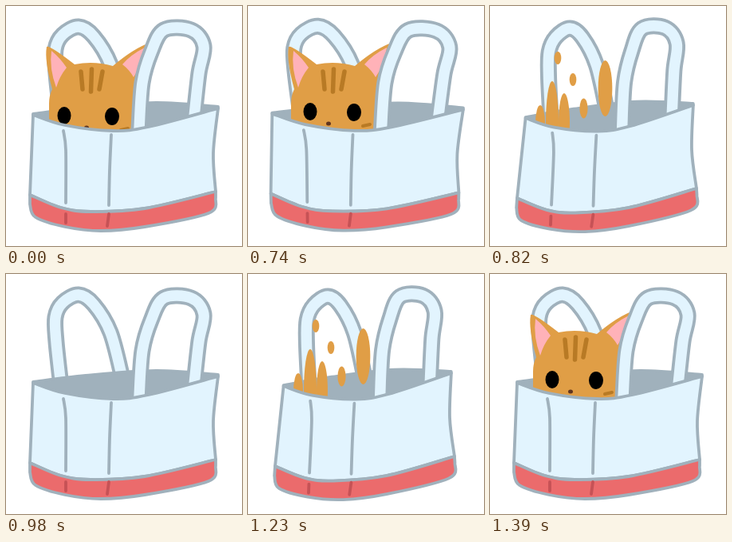
Animation, 296 px wide and 300 px high, one loop 1.47 s. Source, as an HTML page with a canvas:

```html
<!DOCTYPE html>
<html lang="en">
<head>
<meta charset="utf-8">
<title>Cat in a bag</title>
<style>
html, body { margin: 0; width: 100%; height: 100%; overflow: hidden; background: #fff; }
canvas { display: block; width: 296px; height: 300px; }
</style>
</head>
<body>
<canvas id="stage" width="296" height="300"></canvas>
<script>
const ctx = document.getElementById('stage').getContext('2d');
const LINE = '#a0b1bc', CLOTH = '#e2f4fe', RED = '#eb6b6c', RED_SEAM = '#c65256';
const FUR = '#e09e46', STRIPE = '#b87a25', PINK = '#ffb2b8';

// Key points of the bag at rest.
const bag = {
  backStrap: [[69, 140], [63, 85], [62, 54], [71, 36], [91, 26], [110, 38], [131, 73], [146, 130]],
  frontStrap: [[167, 154], [171, 96], [182, 58], [198, 30], [232, 30], [248, 50], [242, 84], [236, 138]],
  rim: [[34, 135], [100, 127], [188, 121], [266, 126]],
  top: [[34, 136], [74, 149], [134, 156], [179, 151], [266, 128]],
  right: [[266, 128], [260, 184], [263, 232]],
  band: [[30, 236], [69, 252], [106, 257], [174, 253], [263, 232]],
  base: [[30, 248], [37, 264], [74, 276], [119, 281], [174, 276], [254, 259], [263, 240]],
  seams: [[[72, 156], [75, 180], [75, 246]], [[132, 161], [130, 205], [129, 249]]],
  redSeams: [[[75, 260], [75, 271]], [[129, 260], [127, 275]]]
};

// Positive pull makes the bag narrow and tall, negative makes it wide.
const bend = pull => pts => pts.map(([x, y]) => [
  150 + (x - 150) * (1 - pull * (0.17 - 0.00058 * y)),
  y + (150 - x) * 0.035 * pull
]);

// Smooth curve through points, continuing the given path.
function curve(path, pts, joined) {
  path[joined ? 'lineTo' : 'moveTo'](...pts[0]);
  for (let i = 0; i < pts.length - 1; i++) {
    const p = pts[i - 1] || pts[i], a = pts[i], b = pts[i + 1], n = pts[i + 2] || b;
    path.bezierCurveTo(
      a[0] + (b[0] - p[0]) / 6, a[1] + (b[1] - p[1]) / 6,
      b[0] - (n[0] - a[0]) / 6, b[1] - (n[1] - a[1]) / 6, ...b);
  }
}
function outline(...sides) {
  const path = new Path2D();
  sides.forEach((pts, i) => curve(path, pts, i > 0));
  return path;
}
function stroke(path, color, width) {
  ctx.strokeStyle = color;
  ctx.lineWidth = width;
  ctx.stroke(path);
}
function fill(path, color) {
  ctx.fillStyle = color;
  ctx.fill(path);
}
function patch(color, ...sides) {
  const path = outline(...sides);
  path.closePath();
  fill(path, color);
  stroke(path, LINE, 3.8);
}
function strap(pts) {
  const path = outline(pts);
  stroke(path, LINE, 21);
  stroke(path, CLOTH, 13.4);
}
function oval(x, y, rx, ry, color) {
  const path = new Path2D();
  path.ellipse(x, y, rx, ry, 0, 0, 7);
  fill(path, color);
}

function drawBag(pull, inside) {
  const at = bend(pull);
  const back = name => at(bag[name]).reverse();
  ctx.lineCap = 'butt';
  strap(at(bag.backStrap));
  patch(LINE, at(bag.rim), back('top'));
  ctx.lineCap = 'round';
  inside();
  ctx.lineCap = 'butt';
  strap(at(bag.frontStrap));
  ctx.lineCap = 'round';
  patch(CLOTH, at(bag.top), at(bag.right), back('band'));
  patch(RED, at(bag.band), back('base'));
  for (const pts of bag.seams) stroke(outline(at(pts)), LINE, 3.8);
  for (const pts of bag.redSeams) stroke(outline(at(pts)), RED_SEAM, 3.8);
}

// dip lowers the face towards the rim.
const cat = dip => () => {
  fill(new Path2D('M54 170V122Q54 112 58 104Q48 68 51 51Q54 48 86 73Q110 68 134 75Q160 53 180 46Q182 70 165 97V170Z'), FUR);
  fill(new Path2D('M57 56Q68 65 76 77Q67 88 63 102Q54 78 57 56Z'), PINK);
  fill(new Path2D('M174 52Q156 61 146 73Q155 80 160 89Q172 72 174 52Z'), PINK);
  for (const lean of [-1, 0, 1]) {
    const x = 107.5 + lean * 13.5, inset = Math.abs(lean) * 3;
    stroke(outline([[x, 79 + inset], [x - 1 - lean * 3, 107 - inset]]), STRIPE, 5.5);
  }
  oval(78 - dip, 132 + dip, 8.5, 11, '#000');
  oval(133, 133 + dip, 9, 11, '#000');
  oval(101, 147 + dip, 3, 2.5, '#60351f');
  stroke(outline([[144, 150 + dip], [153, 148 + dip]]), STRIPE, 4);
};
function splash() {
  for (const [x, width, height] of [[63, 6, 22], [78, 8, 52], [93, 7, 37]])
    oval(x, 146, width, height, FUR);
  for (const [x, y, size] of [[85, 65, 8], [104, 92, 8], [117.5, 128, 12.5], [144.5, 103, 35]])
    oval(x, y, 3 + size / 6, size, FUR);
}
const empty = () => {};

const LOOP = 1470, TALL = 1, WIDE = -0.35;
const hidden = cat(5), peeking = cat(0);
const steps = [
  [0, 0, hidden],
  [660, 0, peeking],
  [740, WIDE, peeking],
  [820, TALL, splash],
  [900, WIDE, empty],
  [980, 0, empty],
  [1230, TALL, splash],
  [1310, WIDE, peeking],
  [1390, 0, peeking]
];

ctx.lineJoin = 'round';
const start = performance.now();
let shown;
function tick() {
  const t = (performance.now() - start) % LOOP;
  const step = steps.findLast(([at]) => at <= t);
  if (step !== shown) {
    ctx.clearRect(0, 0, 296, 300);
    drawBag(step[1], step[2]);
    shown = step;
  }
  requestAnimationFrame(tick);
}
tick();
</script>
</body>
</html>
```
